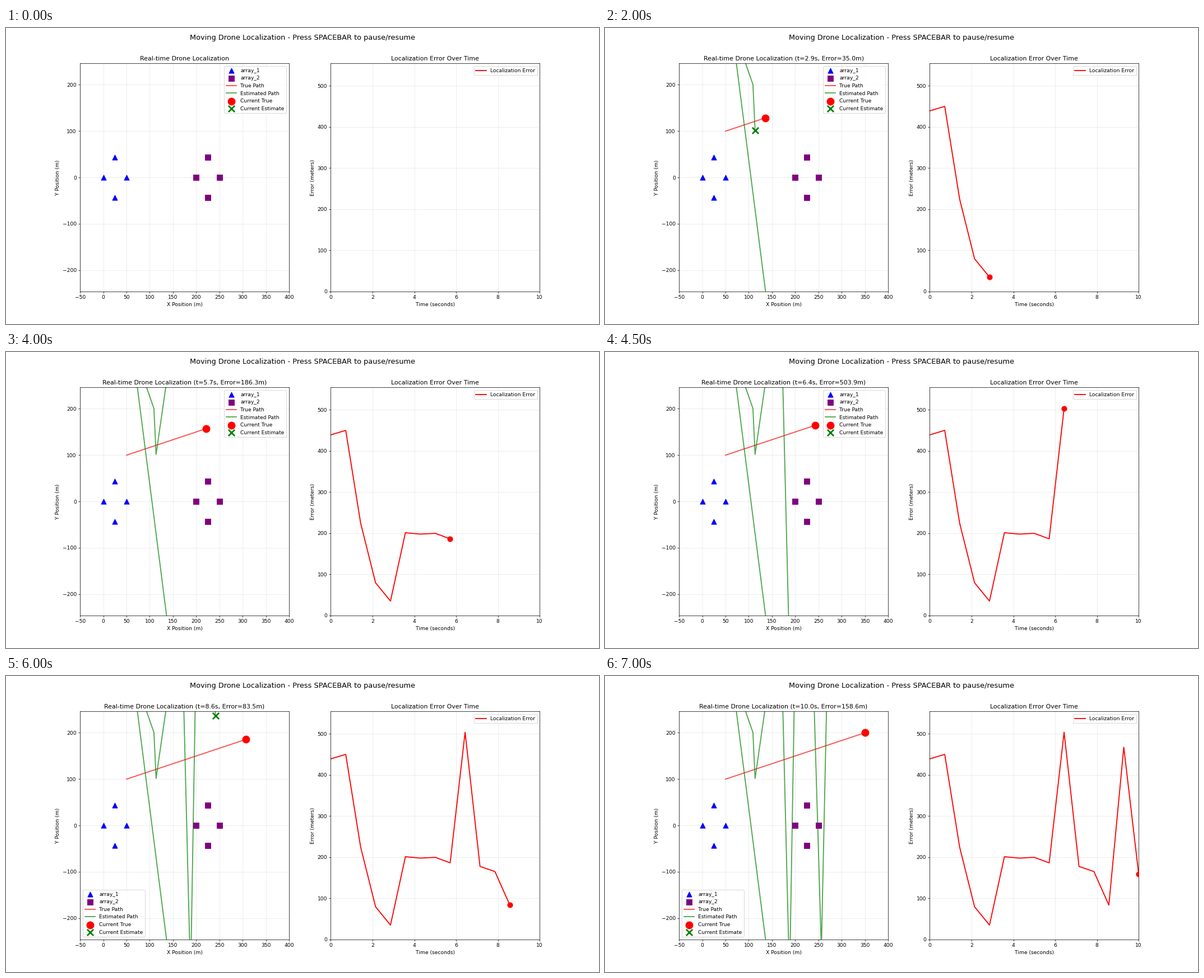
Animation of 1058x529 px, one loop 7500 ms. Source, as a matplotlib script:

```python
import numpy as np
import matplotlib.pyplot as plt
from matplotlib.animation import FuncAnimation

STEPS = 15
INTERVAL = 500
DURATION = 10.0

times = np.linspace(0, DURATION, STEPS)
true_path = np.column_stack([50 + 30 * times, 100 + 10 * times])

# Estimates often jump to the mirrored far field, outside the view.
FAR = 336.5
est_path = np.array([
    (109, -FAR), (147.7, -FAR), (61.8, FAR), (109, 200.5), (113.6, 101.5),
    (147.4, FAR), (139, FAR), (129.2, FAR), (171.3, FAR), (187.9, -FAR),
    (199.2, FAR), (238.5, FAR), (241.5, 237.3), (256.4, -268.5), (269.3, FAR),
])
errors = np.array([439.2, 450.1, 224.5, 79.4, 35.0, 201.2, 197.8, 199.7,
                   186.3, 503.9, 177.5, 165.1, 83.5, 467.4, 158.6])

fig, (ax_map, ax_err) = plt.subplots(1, 2, figsize=(16, 8), dpi=66.125)
fig.suptitle("Moving Drone Localization - Press SPACEBAR to pause/resume",
             fontsize=14)


def style(ax, title, xlabel, ylabel):
    ax.set_title(title)
    ax.set_xlabel(xlabel)
    ax.set_ylabel(ylabel)
    ax.grid(True, alpha=0.3)


def add_array(x, marker, color, label):
    h = 25 * np.sqrt(3)
    ax_map.scatter([x, x + 50, x + 25, x + 25], [0, 0, h, -h], s=100,
                   c=color, marker=marker, label=label, zorder=5)


BASE_TITLE = "Real-time Drone Localization"
style(ax_map, BASE_TITLE, "X Position (m)", "Y Position (m)")
add_array(0, "^", "blue", "array_1")
add_array(200, "s", "purple", "array_2")
true_line, = ax_map.plot([], [], "r-", lw=2, alpha=0.7, label="True Path")
est_line, = ax_map.plot([], [], "g-", lw=2, alpha=0.7, label="Estimated Path")
true_dot = ax_map.scatter([], [], s=200, c="red", marker="o",
                          label="Current True", zorder=10)
est_dot = ax_map.scatter([], [], s=150, c="green", marker="x", linewidths=3,
                         label="Current Estimate", zorder=10)
ax_map.set_xlim(-50, 400)
ax_map.set_ylim(-245.9, 245.9)
legend = ax_map.legend(loc="upper right")

style(ax_err, "Localization Error Over Time", "Time (seconds)",
      "Error (meters)")
err_line, = ax_err.plot([], [], "r-", lw=2, label="Localization Error")
err_dot = ax_err.scatter([], [], s=100, c="red", zorder=5)
ax_err.set_xlim(0, DURATION)
ax_err.set_ylim(0, errors.max() * 1.1)
ax_err.legend(loc="upper right")


def update(i):
    n = i + 1 if i else 0
    err_path = np.column_stack([times, errors])
    for line, dot, path in ((true_line, true_dot, true_path),
                            (est_line, est_dot, est_path),
                            (err_line, err_dot, err_path)):
        line.set_data(path[:n, 0], path[:n, 1])
        dot.set_offsets(path[max(n - 1, 0):n])
    status = f" (t={times[i]:.1f}s, Error={errors[i]:.1f}m)" if i else ""
    ax_map.set_title(BASE_TITLE + status)
    # The legend gives way once the drone flies close to it.
    legend.set_loc("lower left" if i >= 10 else "upper right")
    return []


def reset():
    return update(0)


anim = FuncAnimation(fig, update, frames=STEPS, init_func=reset,
                     interval=INTERVAL, repeat=True, repeat_delay=0)
plt.show()
```
